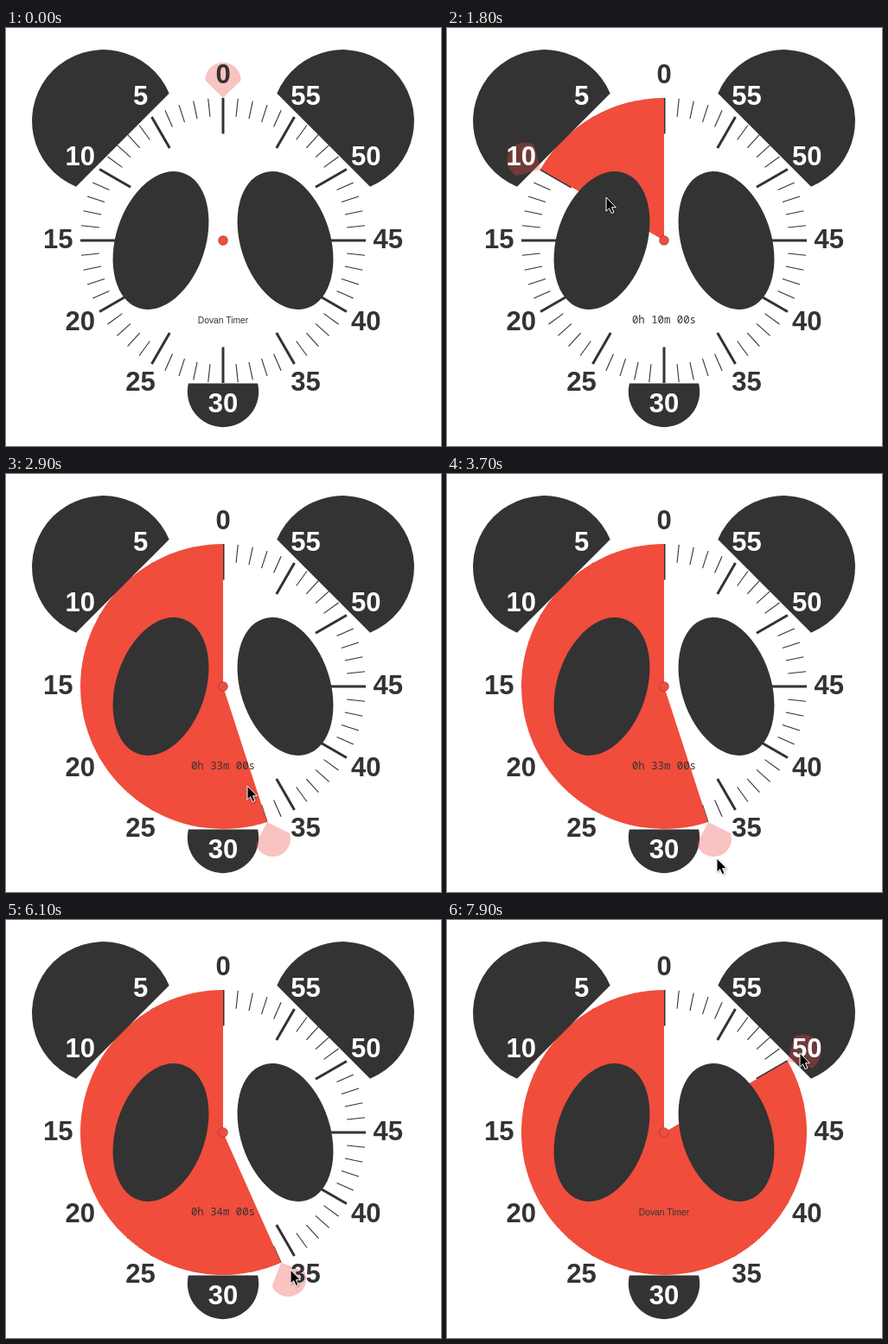
An HTML page for the animation above (8 s loop, 503 by 484 pixels).

```html
<!DOCTYPE html>
<html lang="en">
<head>
<meta charset="utf-8">
<title>Timer</title>
<style>
  html, body { margin: 0; width: 100%; height: 100%; overflow: hidden; background: #fff; }
  svg { display: block; width: 503px; height: 484px; }
  .ink { fill: #333; }
  .red { fill: #f04d3c; }
  #ticks { stroke: #333; }
  #knob { fill: #e94b40; fill-opacity: .33; }
  #hub { stroke: #333; stroke-opacity: .35; }
  text { text-anchor: middle; fill: #333; }
  #digits { font: bold 31px "Liberation Sans", Arial, sans-serif; }
  #digits .light { fill: #fff; }
  #label { font: 10.3px "Liberation Sans", Arial, sans-serif; }
  #label.time { font: 12.35px "Noto Sans Mono", monospace; }
  #cursor { fill: #000; stroke: #fff; filter: drop-shadow(1px 1px 1px rgba(0, 0, 0, .3)); }
</style>
</head>
<body>
<svg viewBox="0 0 503 484">
  <g id="ticks"></g>
  <path id="pie" class="red"/>
  <g class="ink">
    <path id="ear" d="M188.7 75.8A82.5 82.5 0 1 0 81 183.8Z"/>
    <ellipse id="eye" cx="179" cy="246" rx="51.8" ry="82.3" transform="rotate(18 179 246)"/>
    <use href="#ear" transform="matrix(-1 0 0 1 502 0)"/>
    <use href="#eye" transform="matrix(-1 0 0 1 502 0)"/>
    <path d="M210.9 411.5H291.1A41.2 41.2 0 1 1 210.9 411.5Z"/>
  </g>
  <circle id="hub" class="red" cx="251" cy="246" r="5.5"/>
  <path id="knob" d="M251 81L230.3 60.5A20.7 20.7 0 0 1 271.7 60.5Z"/>
  <g id="digits"></g>
  <text id="label" x="251" y="342"></text>
  <path id="cursor" d="M0 0V16.2L3.6 12.8L6.2 18.6L9 17.4L6.5 11.7H11.4Z"/>
</svg>
<script>
const CX = 251, CY = 246, R = 165, LOOP = 8000, STEP = 100;
const $ = id => document.getElementById(id);

// Minutes run counter-clockwise from the top.
const polar = (min, r) => {
  const a = min * Math.PI / 30;
  return [CX - r * Math.sin(a), CY - r * Math.cos(a)];
};

const add = (parent, tag, attrs, text = "") => {
  const el = document.createElementNS("http://www.w3.org/2000/svg", tag);
  for (const key in attrs) el.setAttribute(key, attrs[key]);
  el.textContent = text;
  parent.append(el);
};

for (let m = 0; m < 60; m++) {
  const major = m % 5 === 0;
  const [x1, y1] = polar(m, R);
  const [x2, y2] = polar(m, major ? 123.5 : 144);
  add($("ticks"), "line", { x1, y1, x2, y2, "stroke-width": major ? 3 : 1.1 });
  if (major) {
    const [x, y] = polar(m, 190.8);
    const light = [5, 10, 30, 50, 55].includes(m);
    add($("digits"), "text", { x, y: y + 8.6, class: light ? "light" : "" }, m);
  }
}

// A stroke passes its points at equal intervals, then rests on the last one.
const pointer = [
  { from: 400, to: 1000, points: [[171, 6], [244, 58]] },
  { from: 1100, to: 2600, points: [[244, 58], [209, 95], [182, 165], [203, 256], [254, 297], [276, 346]] },
  { from: 2700, to: 3900, points: [[276, 346], [285, 382], [303, 432], [319, 451]] },
  { from: 4200, to: 5100, points: [[319, 451], [354, 468]] },
  { from: 5100, to: 5900, points: [[354, 468], [314, 424]] },
  { from: 6000, to: 7200, points: [[314, 424], [438, 255], [408, 154]] }
];
const minutes = [
  { from: 1200, to: 2600, points: [[0], [5], [13], [26], [33]] },
  { from: 6000, to: 7200, points: [[33], [44], [50]] }
];

const spline = (a, b, c, d, p) =>
  b + p / 2 * (c - a + p * (2 * a - 5 * b + 4 * c - d + p * (3 * (b - c) + d - a)));

function follow(strokes, t) {
  const { from, to, points } = strokes.filter(s => s.from <= t).pop() || strokes[0];
  const last = points.length - 1;
  const pos = Math.min(Math.max((t - from) / (to - from), 0), 1) * last;
  const i = Math.min(Math.floor(pos), last - 1);
  const at = k => points[Math.min(Math.max(k, 0), last)];
  return points[0].map((_, n) =>
    spline(at(i - 1)[n], at(i)[n], at(i + 1)[n], at(i + 2)[n], pos - i));
}

const pressed = t => (t >= 1200 && t < 4300) || (t >= 5900 && t < 7700);

function draw(t) {
  const min = Math.floor(follow(minutes, t)[0] + 1e-6);
  const [x, y] = polar(min, R);
  $("pie").setAttribute("d", min
    ? `M${CX} ${CY}V${CY - R}A${R} ${R} 0 ${min > 30 ? 1 : 0} 0 ${x} ${y}Z` : "");
  $("knob").setAttribute("transform", `rotate(${-6 * min} ${CX} ${CY})`);

  const timed = pressed(t);
  $("label").setAttribute("class", timed ? "time" : "");
  $("label").textContent = timed ? `0h ${String(min).padStart(2, "0")}m 00s` : "Dovan Timer";

  const tip = follow(pointer, t).map(Math.round);
  $("cursor").setAttribute("transform", `translate(${tip})`);
  $("cursor").setAttribute("visibility", t < 400 ? "hidden" : "visible");
}

const start = performance.now();
function tick() {
  const t = (performance.now() - start) % LOOP;
  draw(Math.floor(t / STEP) * STEP);
  requestAnimationFrame(tick);
}
tick();
</script>
</body>
</html>
```
